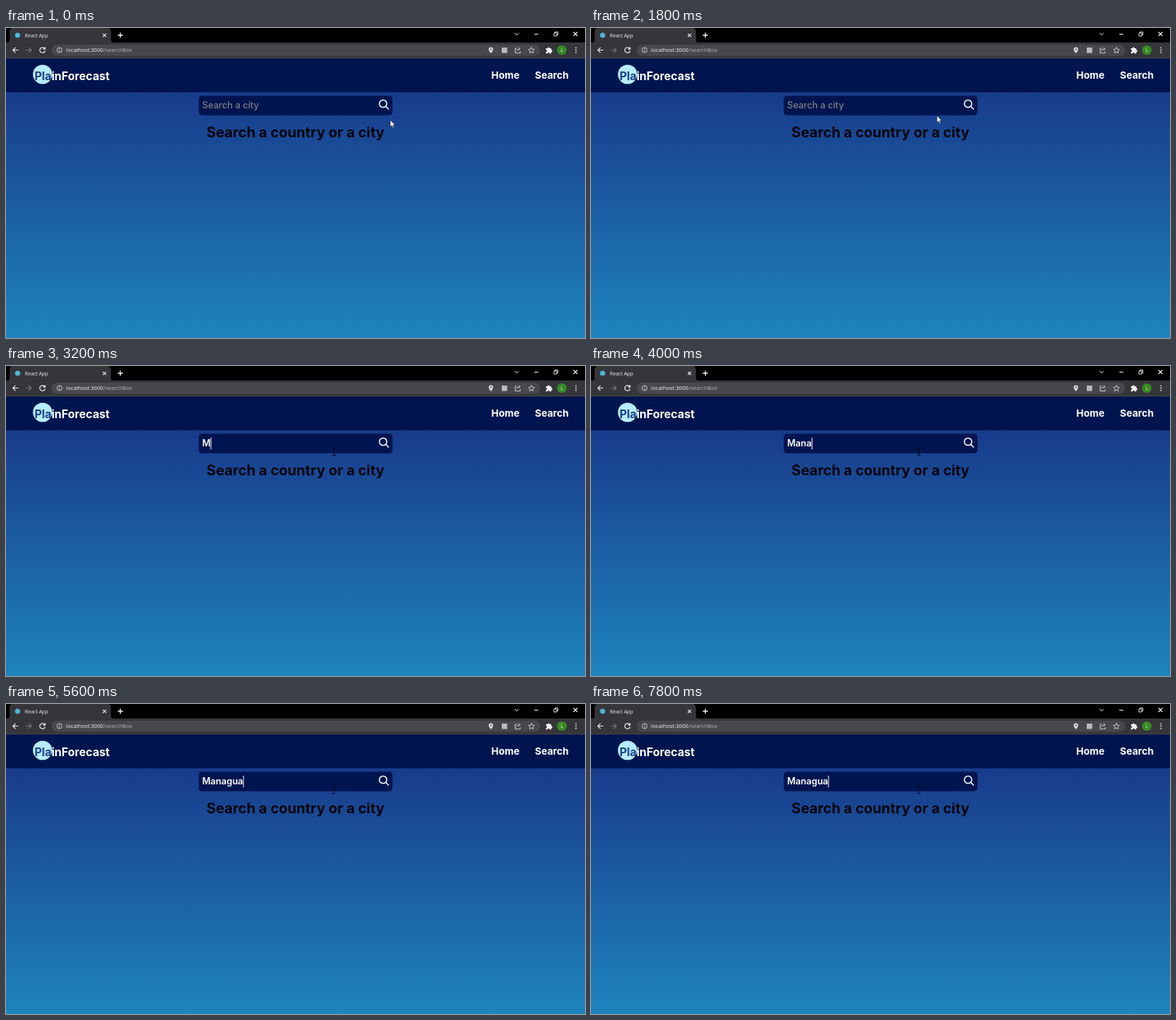
Recreate the animation shown at these times as an HTML page. Size 800 by 428 pixels, loop 8000 ms.

```html
<!DOCTYPE html>
<html lang="en">
<head>
<meta charset="utf-8">
<title>City search</title>
<style>
  html, body { margin: 0; width: 100%; height: 100%; overflow: hidden; background: #000; }
  svg { display: block; width: 100%; height: 100%; }
  text { white-space: pre; }
  .ui { font-family: "Open Sans", "Noto Sans", sans-serif; }
  .page { font-family: Inter, Roboto, sans-serif; }
  .line { fill: none; stroke: #f1f1f2; stroke-width: 1.2; }
  .dim { stroke: #c9c9cc; stroke-width: 1; }
  .bold { font-weight: 700; }
</style>
</head>
<body>
<svg viewBox="0 0 800 428" preserveAspectRatio="none">
  <defs>
    <linearGradient id="sky" x1="0" y1="0" x2="0" y2="1">
      <stop offset="0" stop-color="#183b8b"/>
      <stop offset="1" stop-color="#1e84be"/>
    </linearGradient>
  </defs>

  <!-- Tab strip -->
  <rect width="800" height="21" fill="#000"/>
  <path d="M0 21Q5 21 5 16V5Q5 0 10 0H140Q145 0 145 5V16Q145 21 150 21Z" fill="#35353a"/>
  <circle cx="16" cy="10" r="3.6" fill="#4fb4d6"/>
  <text class="ui" x="26" y="12.6" font-size="6.9" fill="#f1f1f2">React App</text>
  <g class="line">
    <path d="M133.8 7.8l4.6 4.6m0-4.6l-4.6 4.6"/>
    <path d="M154.5 10h7m-3.500-3.500v7" stroke-width="1.4"/>
    <path d="M703 7l2.700 2.700L708.400 7" stroke-width="1"/>
    <path d="M730 8.500h5.500" stroke-width="1"/>
    <path d="M757 7h4v4h-4zM758.500 7V5.500h4v4H761" stroke-width=".9"/>
    <path d="M784 5.500l5.500 5.500m0-5.500l-5.500 5.500"/>
  </g>

  <!-- Toolbar -->
  <rect y="20" width="800" height="22" fill="#36363a"/>
  <rect y="41" width="800" height="1" fill="#46474d"/>
  <rect x="63" y="23" width="675" height="15.500" rx="7.750" fill="#48484c"/>
  <g class="line">
    <path d="M17 30.500H9.500m3.700-3.700l-3.700 3.700 3.700 3.700"/>
    <path d="M27.500 30.500H35m-3.700-3.700l3.700 3.700-3.700 3.700" stroke="#77777b"/>
    <path d="M53.300 28.200A3.700 3.700 0 1 0 54 31.500M54 26.300v2.800h-2.800"/>
  </g>
  <g class="line dim">
    <circle cx="74" cy="30.500" r="3.500"/>
    <path d="M74 30v2.500M74 28v1"/>
    <path d="M706 28h-2.500v6.500h7V32M705.500 32q.3-3.300 4.500-3.300m-1.700-2l2 2-2 2"/>
    <path d="M726 26.700l1.200 2.500 2.800.4-2 2 .5 2.800-2.500-1.400-2.500 1.400.5-2.800-2-2 2.800-.4z"/>
  </g>
  <path fill="#dededf" fill-rule="evenodd" d="M670 35q-3-3.500-3-5.500a3 3 0 0 1 6 0q0 2-3 5.500zM670 28.400a1.100 1.100 0 1 0 0 2.200 1.100 1.100 0 0 0 0-2.200z"/>
  <rect x="685" y="27" width="7.500" height="7.500" fill="#b9babd"/>
  <path fill="#f1f1f2" d="M746 28h2.200a1.500 1.500 0 0 1 3 0h2.200v2.300a1.500 1.500 0 0 1 0 3v2h-2.300a1.500 1.500 0 0 0-3 0H746v-2.200a1.500 1.500 0 0 0 0-3z"/>
  <circle cx="768" cy="30.500" r="6.600" fill="#368a25"/>
  <text class="ui" x="768" y="33" font-size="7" text-anchor="middle" fill="#e8f4e5">L</text>
  <g fill="#f1f1f2">
    <circle cx="787.500" cy="27.300" r=".9"/>
    <circle cx="787.500" cy="30.500" r=".9"/>
    <circle cx="787.500" cy="33.700" r=".9"/>
  </g>
  <text class="ui" x="83" y="33.200" font-size="7.680" fill="#b4b4b7"><tspan fill="#f4f4f5">localhost:3000</tspan>/searchBox</text>

  <!-- Page -->
  <rect y="88" width="800" height="340" fill="url(#sky)"/>
  <rect y="42" width="800" height="46.800" fill="#00154f"/>
  <g class="page">
    <circle cx="50.500" cy="64" r="13.300" fill="#b5ecfc"/>
    <g class="bold" fill="#fff">
      <text x="39.500" y="71.500" font-size="15.600"><tspan fill="#1b3f88">Pla</tspan>inForecast</text>
      <text x="670.500" y="70" font-size="13.600">Home</text>
      <text x="730.800" y="70" font-size="13.600">Search</text>
    </g>
    <rect x="266.300" y="93.500" width="267.700" height="27" rx="4.500" fill="#00154f"/>
    <g fill="none" stroke="#fff" stroke-width="1.500" stroke-linecap="round">
      <circle cx="521" cy="104.500" r="5.100"/>
      <path d="M524.800 108.300l3.700 3.700"/>
    </g>
    <text id="field" x="271" y="111.300" font-size="12.600"></text>
    <text class="bold" x="400" y="150.500" font-size="19.700" text-anchor="middle" fill="#02040c">Search a country or a city</text>
  </g>
  <rect id="caret" y="99" width="1" height="16" fill="#fff"/>

  <path id="arrow" d="M0 0V9.500L2.200 7.500 3.700 11 5.200 10.300 3.700 7H6.500Z" fill="#fff" stroke="#111a38" stroke-width=".6"/>
  <path id="beam" d="M-2.500-5H-.7Q0-5 0-4.300 0-5 .7-5H2.500M0-4.300V4.300M-2.500 5H-.7Q0 5 0 4.300 0 5 .7 5H2.500" fill="none" stroke="#03081c" stroke-width="1"/>
</svg>
<script>
  const LOOP = 8000, TICK = 200;
  const CITY = "Managua";
  const CLICK = 2260, FIRST_KEY = 3150, LAST_KEY = 4450, BLINK = 530;
  const FIELD_X = 271, FIELD_BOTTOM = 120.5;
  // Pointer stops: time, x, y
  const PATH = [
    [0, 531, 127], [800, 527, 125], [1600, 527, 125],
    [1800, 478, 121], [2000, 458, 119], [2200, 453.5, 118.5],
    [3200, 453.5, 118.5], [5000, 452.7, 118.5]
  ];

  const [field, caret, arrow, beam] =
    ["field", "caret", "arrow", "beam"].map(id => document.getElementById(id));
  const show = (el, on) => el.setAttribute("visibility", on ? "visible" : "hidden");

  function pointerAt(t) {
    const next = PATH.findIndex(stop => stop[0] > t);
    if (next < 0) return PATH[PATH.length - 1].slice(1);
    const [t0, x0, y0] = PATH[next - 1], [t1, x1, y1] = PATH[next];
    const k = (t - t0) / (t1 - t0);
    return [x0 + (x1 - x0) * k, y0 + (y1 - y0) * k];
  }

  function drawField(t) {
    const gap = (LAST_KEY - FIRST_KEY) / (CITY.length - 1);
    const count = t < FIRST_KEY ? 0 : Math.min(CITY.length, Math.floor((t - FIRST_KEY) / gap + 1e-6) + 1);
    field.textContent = count ? CITY.slice(0, count) : "Search a city";
    field.setAttribute("fill", count ? "#fff" : "#7d7f86");
    field.setAttribute("font-weight", count ? 600 : 500);

    // Each key press restarts the caret blink
    const lastInput = count ? FIRST_KEY + (count - 1) * gap : CLICK;
    show(caret, t >= CLICK && Math.floor((t - lastInput) / BLINK) % 2 === 0);
    caret.setAttribute("x", FIELD_X + (count ? field.getComputedTextLength() : 0));
  }

  function render(time) {
    const t = Math.floor((time % LOOP) / TICK) * TICK;
    const [x, y] = pointerAt(t);
    const overField = y < FIELD_BOTTOM;
    for (const el of [arrow, beam]) el.setAttribute("transform", `translate(${x} ${y})`);
    show(arrow, !overField);
    show(beam, overField);
    drawField(t);
  }

  const start = performance.now();
  function frame() {
    render(performance.now() - start);
    requestAnimationFrame(frame);
  }
  frame();
</script>
</body>
</html>
```
